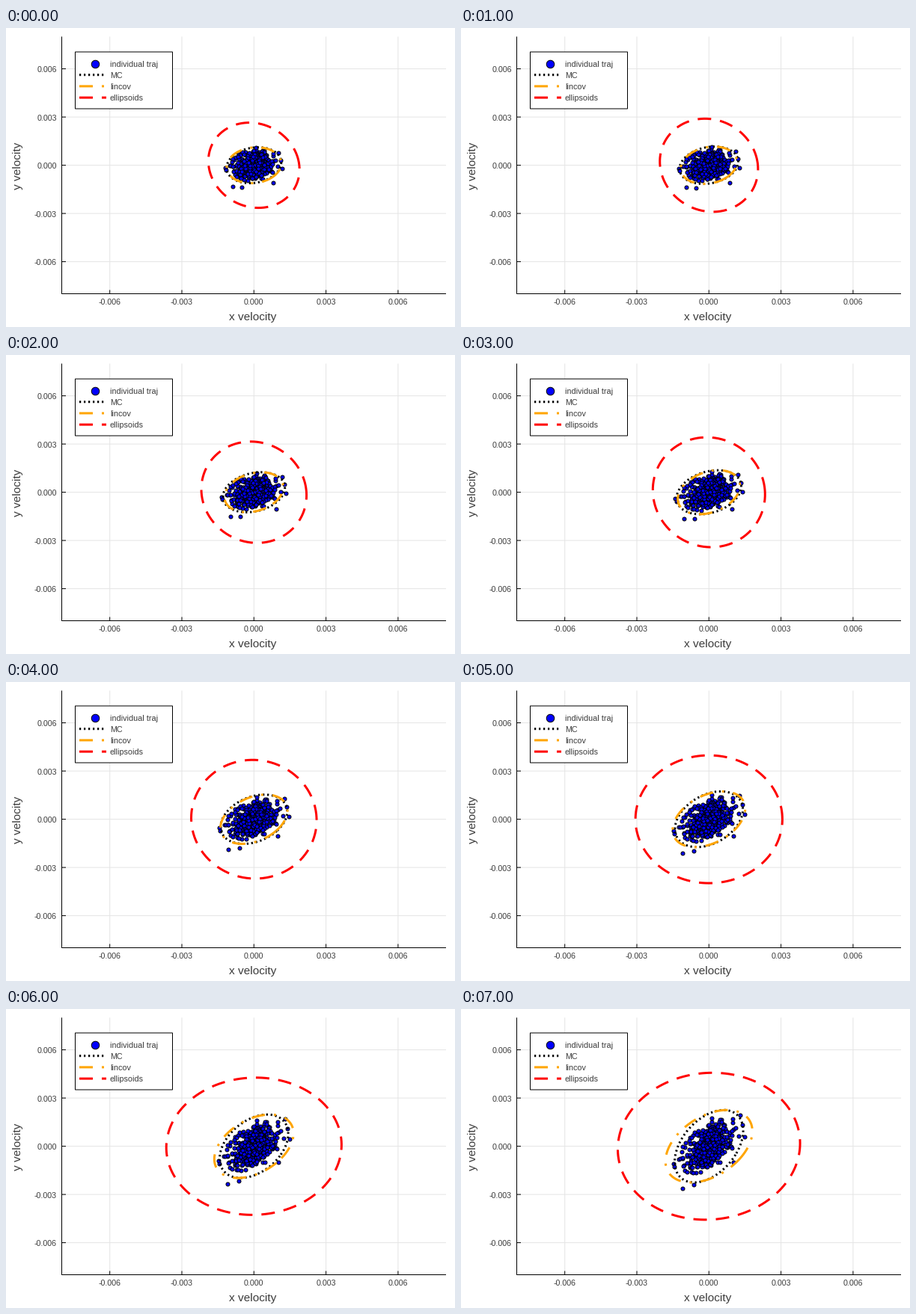
A matplotlib script that plays this animation: 600 px wide and 400 px high, repeating every 8000 ms.

```python
import numpy as np
import matplotlib.pyplot as plt
from matplotlib.animation import FuncAnimation
from matplotlib.patches import Rectangle

PX = 0.72                      # points per pixel at 100 dpi
CX, CY = 331.3, 183.6          # position of the data origin
SX, SY = 32.1, 21.5            # pixels per 0.001
LEFT, RIGHT, TOP, BOTTOM = 74.5, 588, 11.5, 355.5
STEPS = 8
INK = "#3c3c3c"

plt.rcParams["font.family"] = "Liberation Sans"
fig = plt.figure(figsize=(6, 4), dpi=100, facecolor="white")
ax = fig.add_axes([0, 0, 1, 1])
ax.set_xlim(0, 600)
ax.set_ylim(400, 0)
ax.axis("off")


def line(xs, ys, color="black", width=1.0, style="-", z=1):
    return ax.plot(xs, ys, color=color, lw=width * PX, ls=style, zorder=z,
                   solid_capstyle="butt", snap=False)[0]


def text(x, y, s, size, ha="center", rotation=0):
    ax.text(x, y, s, fontsize=size * PX, color=INK, ha=ha, zorder=12,
            va="center" if rotation else "center_baseline",
            rotation=rotation)


def dots(xs, ys, size, z):
    return ax.plot(xs, ys, "o", ms=size * PX, mfc="blue", mec="black",
                   mew=PX, zorder=z, snap=False)[0]


# Axes, grid and labels
for k in range(-2, 3):
    gx, gy = CX + 3 * k * SX, CY - 3 * k * SY
    label = f"{0.003 * k:.3f}"
    line([gx, gx], [TOP, BOTTOM], "#e5e5e5")
    line([LEFT, RIGHT], [gy, gy], "#e5e5e5")
    line([gx, gx], [BOTTOM - 5, BOTTOM], z=2)
    line([LEFT, LEFT + 5.5], [gy, gy], z=2)
    text(gx, 366.5, label, 10.6)
    text(68, gy + 0.6, label, 10.6, "right")
line([LEFT, LEFT, RIGHT], [TOP, BOTTOM, BOTTOM], z=2)
text(329.8, 385, "x velocity", 15.4)
text(16.3, 184.3, "y velocity", 15.4, rotation=90)


# Each shape: half width, half height (pixels) and correlation at step t
def spread(t):
    return 24 + 0.55 * t + 0.42 * t**2


def sampled(t):
    return 36.5 + 2.9 * t - 0.225 * t**2, spread(t), 0.15 + 0.04 * t


def linear(t):
    return (36.5 + 0.7 * t + 0.34 * t**2, spread(t),
            0.1 + 0.085 * t - 0.0057 * t**2)


def bound(t):
    surge = np.clip((t - 3) / 3, 0, 1) ** 1.75
    return (60.9 + 4.7 * t + 28 * surge, 57 + 5.2 * t + 0.1 * t**2,
            -0.1 + 0.02 * t)


CURVES = {
    "MC": ("black", (0, (0.75, 1.25)), sampled),
    "lincov": ("orange", (0, (6, 4, 1, 4)), linear),
    "ellipsoids": ("red", (0, (6, 4)), bound),
}


def ellipse(w, h, rho):
    """Outline in pixels, starting on the smaller axis of the covariance."""
    a, b = w / SX, h / SY
    c = rho * a * b
    (small, large), vec = np.linalg.eigh([[a * a, c], [c, b * b]])
    ux, uy = vec[:, 0] * (1 if vec[0, 0] > 0 else -1)
    t = np.linspace(0, 2 * np.pi, 300)
    p, q = np.sqrt(small) * np.cos(t), np.sqrt(large) * np.sin(t)
    return CX + SX * (p * ux - q * uy), CY - SY * (p * uy + q * ux)


# Starting offsets: a random cloud and a few far points around it
rng = np.random.default_rng(12)
z = rng.standard_normal((520, 2))
z = z[np.hypot(*z.T) < 2.75]
w0, h0, rho0 = sampled(0)
cloud = z @ [[w0 / 3, rho0 * h0 / 3], [0, h0 / 3]]
far = [(-28, -28), (-16, -29), (26, -23), (38, -4), (36, 7), (33, 17),
       (3, 24), (-38, -3), (-37, -6)]
start_x, start_y = np.vstack([cloud, far]).T


def points(t):
    """Stretch and shear the starting cloud."""
    grow = 0.5 * (t / 7) ** 1.5
    x = start_x * sampled(t)[0] / w0
    y = start_y * (1 + grow) + start_x * grow
    return CX + x, CY - y


swarm = dots([], [], 5, 4)
outlines = [(line([], [], color, 3, style, 5 + i), shape)
            for i, (color, style, shape) in enumerate(CURVES.values())]

# Legend
ax.add_patch(Rectangle((92.5, 32), 130, 76, fc="white", ec="black",
                       lw=PX, zorder=10, snap=False))
dots([119], [47.5], 10.5, 11)
text(138.8, 47.8, "individual traj", 10.8, "left")
for i, (name, (color, style, _)) in enumerate(CURVES.items()):
    y = 62.7 + 15.2 * i
    line([98, 134], [y, y], color, 3, style, 11)
    text(138.8, y + 0.1, name, 10.8, "left")


def update(step):
    swarm.set_data(*points(step))
    for curve, shape in outlines:
        curve.set_data(*ellipse(*shape(step)))
    return [swarm] + [curve for curve, _ in outlines]


anim = FuncAnimation(fig, update, frames=STEPS, interval=1000, repeat=True,
                     repeat_delay=0, blit=False)
plt.show()
```
